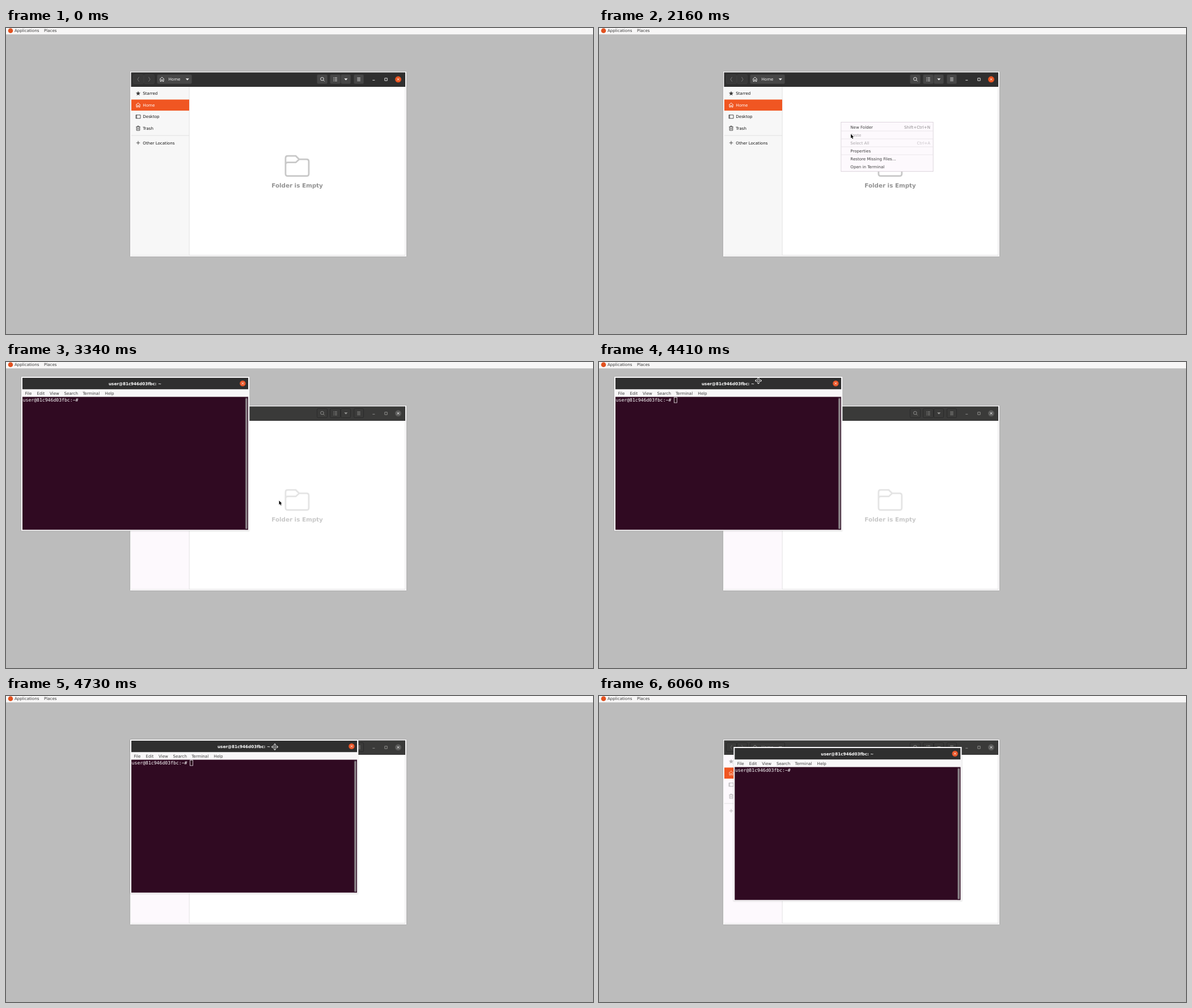
These frames come from a looping animation (1035 by 541 pixels, 6.28 s). An HTML page with a canvas:

```html
<!DOCTYPE html>
<html lang="en">
<head>
<meta charset="utf-8">
<title>Opening a terminal</title>
<style>
  html, body { margin: 0; width: 100%; height: 100%; overflow: hidden; background: #bcbcbc; }
  canvas { display: block; }
</style>
</head>
<body>
<canvas id="stage" width="1035" height="541"></canvas>
<script>
const ctx = document.getElementById('stage').getContext('2d');
const LOOP = 6280;
const SANS = '"DejaVu Sans", sans-serif';
const MONO = '"DejaVu Sans Mono", monospace';
const HOST = 'user@81c946d03fbc';

// Pointer track: time, x, y
const TRACK = [
  [210, 956, 525], [530, 560, 262], [770, 434, 176], [850, 430, 170], [920, 428, 167],
  [990, 428, 167], [1070, 427, 166.5], [2080, 427, 166.5], [2160, 444, 187.5],
  [2400, 468, 224], [2710, 481, 244], [2790, 481.5, 245], [3640, 481.5, 245],
  [3720, 470, 232], [3960, 320, 70], [4100, 281, 33], [4410, 281, 33],
  [4570, 353.5, 50.5], [4730, 474, 90], [4890, 488, 95], [4960, 491.3, 97],
  [5260, 491.3, 97], [5340, 500, 103], [5580, 760, 320], [5910, 1029, 535], [5980, 1031, 538]
];

const ICONS = {
  home: 'M-4 0L0-3.8 4 0M-3-.8V3.7H-1V.8H1V3.7H3V-.8',
  star: 'M0-4L1.1-1.2 4-1 1.8.9 2.5 3.8 0 2.2-2.5 3.8-1.8.9-4-1-1.1-1.2Z',
  desktop: 'M-4-3H4V3H-4ZM-2.6-3V3',
  trash: 'M-3.7-2.5H3.7M-1.3-2.5V-4H1.3V-2.5M-2.8-2.5V3.8H2.8V-2.5M-1-.8V2.3M1-.8V2.3',
  plus: 'M-3.2 0H3.2M0-3.2V3.2',
  back: 'M1.3-4L-1.3 0 1.3 4',
  next: 'M-1.3-4L1.3 0-1.3 4',
  search: 'M2.2-.6A2.8 2.8 0 1 1-3.4-.6A2.8 2.8 0 1 1 2.2-.6M1.4 1.4L3.7 3.7',
  list: 'M-3.2-2.7H-1.7M-.7-2.7H3.2M-3.2 0H-1.7M-.7 0H3.2M-3.2 2.7H-1.7M-.7 2.7H3.2',
  menu: 'M-2.8-2.5H2.8M-2.8 0H2.8M-2.8 2.5H2.8',
  caret: 'M-3-1.5H3L0 1.8Z',
  minimise: 'M-2 1.6H2',
  maximise: 'M-2.2-2.2H2.2V2.2H-2.2Z',
  close: 'M-1.9-1.9L1.9 1.9M1.9-1.9L-1.9 1.9',
  folder: 'M-16.5 18Q-20.5 18-20.5 14V-13.5Q-20.5-17.5-16.5-17.5H-2.5L3.5-11.5H16.5Q20.5-11.5 20.5-7.5V14Q20.5 18 16.5 18Z'
    + 'M-20.5-2Q-20.5-6-16.5-6H-2.5L3.5-11.5',
  arrow: 'M0 0V7.2L1.7 5.7 2.9 8.4 4.1 7.9 2.9 5.3H5Z',
  move: 'M-4 0H4M0-4V4M-2.8-1.2L-4 0-2.8 1.2M2.8-1.2L4 0 2.8 1.2M-1.2-2.8L0-4 1.2-2.8M-1.2 2.8L0 4 1.2 2.8'
};
for (const name in ICONS) ICONS[name] = new Path2D(ICONS[name]);

function rect(x, y, w, h, color) {
  ctx.fillStyle = color;
  ctx.fillRect(x, y, w, h);
}

function circle(x, y, r, color) {
  ctx.fillStyle = color;
  ctx.beginPath();
  ctx.arc(x, y, r, 0, Math.PI * 2);
  ctx.fill();
}

function button(x, y, w, h, fill, border) {
  ctx.beginPath();
  ctx.roundRect(x + .5, y + .5, w - 1, h - 1, 2);
  ctx.fillStyle = fill;
  ctx.fill();
  ctx.strokeStyle = border;
  ctx.lineWidth = 1;
  ctx.stroke();
}

// y is the middle of the capital letters
function text(str, x, y, color, { size = 7.1, family = SANS, bold = false, align = 'left' } = {}) {
  ctx.font = `${bold ? 'bold ' : ''}${size}px ${family}`;
  ctx.textAlign = align;
  ctx.fillStyle = color;
  ctx.fillText(str, x, y + size * .365);
}

function icon(name, x, y, color, width = .9) {
  ctx.save();
  ctx.translate(x, y);
  ctx.lineWidth = width;
  ctx.strokeStyle = ctx.fillStyle = color;
  if (width) ctx.stroke(ICONS[name]);
  else ctx.fill(ICONS[name]);
  ctx.restore();
}

function frame(x, y, w, h) {
  ctx.save();
  ctx.shadowColor = 'rgba(0,0,0,.18)';
  ctx.shadowBlur = 2;
  rect(x, y, w, h, '#f8f7f8');
  ctx.restore();
}

function pointerAt(t) {
  const i = TRACK.findLastIndex(key => key[0] <= t);
  const [t0, x0, y0] = TRACK[i];
  const [t1, x1, y1] = TRACK[i + 1] || [LOOP, x0, y0];
  const steps = Math.max(1, Math.round((t1 - t0) / 79));
  const p = Math.floor((t - t0) / (t1 - t0) * steps + .03) / steps;
  return [x0 + (x1 - x0) * p, y0 + (y1 - y0) * p];
}

function drawDesktop() {
  rect(0, 0, 1035, 541, '#bcbcbc');
  rect(0, 0, 1035, 11, '#f7f6f6');
  rect(0, 11, 1035, .6, '#d8d8d8');
  circle(8, 4.7, 4.3, '#e2511f');
  text('Applications', 15, 4.7, '#3a3a3a');
  text('Places', 67, 4.7, '#3a3a3a');
}

function drawFiles(active) {
  const pick = (on, off) => active ? on : off;
  const head = pick('#2f2f2f', '#3a3a39');
  const ink = pick('#f2f2f2', '#989896');
  const face = pick('#474747', head);
  const edge = pick('#3d3d3d', '#2a2a2a');
  const dim = pick('#7d7d7d', '#666');

  frame(219, 77, 487, 327);
  rect(220.5, 78.5, 483.5, 25.5, head);
  rect(221, 104, 483, 298, '#fff');
  rect(221, 401.5, 483, .7, '#d4d4d4');
  rect(703.5, 104, .6, 298, '#dcdcdc');

  button(224, 82, 19, 17, pick('#383838', head), edge);
  button(243, 82, 19, 17, pick('#383838', head), edge);
  icon('back', 233.3, 90.7, dim);
  icon('next', 252.7, 90.7, dim);
  button(266, 82, 62, 17, face, edge);
  icon('home', 275, 90.7, ink);
  text('Home', 286.5, 90.7, ink);
  icon('caret', 319.8, 90.8, ink, 0);
  for (const [x, w] of [[548, 19], [571, 19], [590, 18], [613, 18]]) button(x, 82, w, 17, face, edge);
  icon('search', 558, 90.7, ink);
  icon('list', 580.5, 90.7, ink);
  icon('caret', 599.3, 90.8, ink, 0);
  icon('menu', 622, 90.7, ink);
  icon('minimise', 648.3, 90.7, ink);
  icon('maximise', 670, 90.9, ink);
  circle(691.5, 90.8, 5.5, pick('#e95420', '#5b5b5a'));
  icon('close', 691.5, 90.8, '#fff');

  const label = pick('#161616', '#9b999b');
  const mark = pick('#3d3d3d', '#b4b1b4');
  rect(221, 104, 102, 297.5, pick('#f7f7f7', '#fdf9fd'));
  rect(322.7, 104, .8, 297.5, '#dcdcdc');
  rect(221, 126.5, 102, 19.6, '#f05622');
  rect(221, 189.6, 102, .8, '#dadada');
  const places = [['star', 'Starred', 115.5], ['home', 'Home', 136.2], ['desktop', 'Desktop', 156.8],
    ['trash', 'Trash', 177.3], ['plus', 'Other Locations', 203]];
  for (const [name, str, y] of places) {
    const selected = name === 'home';
    icon(name, 233, y, selected ? pick('#fff', '#fbc9b5') : mark, name === 'star' ? 0 : .9);
    text(str, 241.3, y, selected ? '#fff' : label);
  }
  icon('folder', 513.4, 243.7, pick('#c8c8c8', '#e4e4e4'), 2.8);
  text('Folder is Empty', 513.5, 278, pick('#929292', '#c8c8c8'), { size: 10.34, bold: true, align: 'center' });
}

function drawMenu(pointerY) {
  rect(426.5, 166, 163, 88, '#cfc6cf');
  rect(427.2, 166.7, 161.6, 86.6, '#fdf9fd');
  const rows = [['New Folder', 175, 'Shift+Ctrl+N'], ['Paste', 189, '', true], ['Select All', 203, 'Ctrl+A', true],
    ['Properties', 217], ['Restore Missing Files…', 231.3], ['Open in Terminal', 245]];
  for (const [str, y, keys, disabled] of rows) {
    if (!disabled && Math.abs(pointerY - y) < 7 && pointerY > 170) rect(427.2, y - 6.7, 161.6, 13.6, '#e8e3e8');
    text(str, 443.3, y, disabled ? '#aaa6aa' : '#3d3d3d');
    if (keys) text(keys, 584, y, disabled ? '#c8c3c8' : '#8f8c8f', { align: 'right' });
  }
  for (const y of [182, 196, 210, 224]) rect(427.2, y - .3, 161.6, .7, '#e2dce2');
}

function drawTextCursor(t) {
  const outline = t >= 4410 && t < 5190;
  const filled = (t >= 3420 && t < 3960) || (t >= 5190 && t < 5820);
  if (filled) rect(132, 62.3, 5.2, 9.8, '#fff');
  if (!outline) return;
  ctx.strokeStyle = '#e8e4e7';
  ctx.lineWidth = .8;
  ctx.strokeRect(132.4, 62.6, 5, 9.4);
}

function drawTerminal(t, dx, dy) {
  ctx.save();
  ctx.translate(dx, dy);
  frame(27, 26, 402.3, 272.5);
  rect(29, 28, 398, 20.2, '#2f2f2f');
  rect(29, 61.6, 398, 235, '#300a22');
  if (t >= 3340) {
    text(HOST + ': ~', 227.5, 38, '#fff', { size: 7.16, bold: true, align: 'center' });
    circle(417.4, 37.9, 5.2, '#e9572a');
    icon('close', 417.4, 37.9, '#fff', .8);
    const menus = [['File', 33.5], ['Edit', 54.5], ['View', 77], ['Search', 102.6], ['Terminal', 135.2], ['Help', 174.3]];
    for (const [str, x] of menus) text(str, x, 55, '#3d3d3d');
    text(HOST + ':~#', 29.6, 67.2, '#fff', { size: 8.14, family: MONO });
    rect(421.5, 62, 5.5, 234.3, '#3f2035');
    ctx.beginPath();
    ctx.roundRect(422.3, 64, 3.2, 231, 1.5);
    ctx.fillStyle = '#8d868b';
    ctx.fill();
    drawTextCursor(t);
  }
  ctx.restore();
}

function drawPointer(t, x, y) {
  const dragging = t >= 4410 && t < 5190;
  const shape = dragging ? 'move' : 'arrow';
  icon(shape, x, y, '#fff', dragging ? 2.8 : 1.2);
  icon(shape, x, y, '#000', dragging ? 1 : 0);
}

// The dragged window clings to the edges of the one behind it
const snap = (value, edge) => Math.abs(value - edge) < 8 ? edge : value;

function draw(t) {
  const showPointer = t >= 210 && t < 6060;
  const [x, y] = showPointer ? pointerAt(t) : [0, 0];
  ctx.textRendering = 'geometricPrecision';
  drawDesktop();
  drawFiles(t < 3260);
  if (t >= 1530 && t < 3110) drawMenu(y);
  if (t >= 3260) {
    const [dx, dy] = t < 4410 ? [0, 0]
      : t < 4960 ? [snap(x - 281, 192), snap(y - 33, 51)] : [210.3, 64];
    drawTerminal(t, dx, dy);
  }
  if (showPointer) drawPointer(t, x, y);
}

const start = performance.now();
function tick() {
  draw((performance.now() - start) % LOOP);
  requestAnimationFrame(tick);
}
tick();
</script>
</body>
</html>
```
